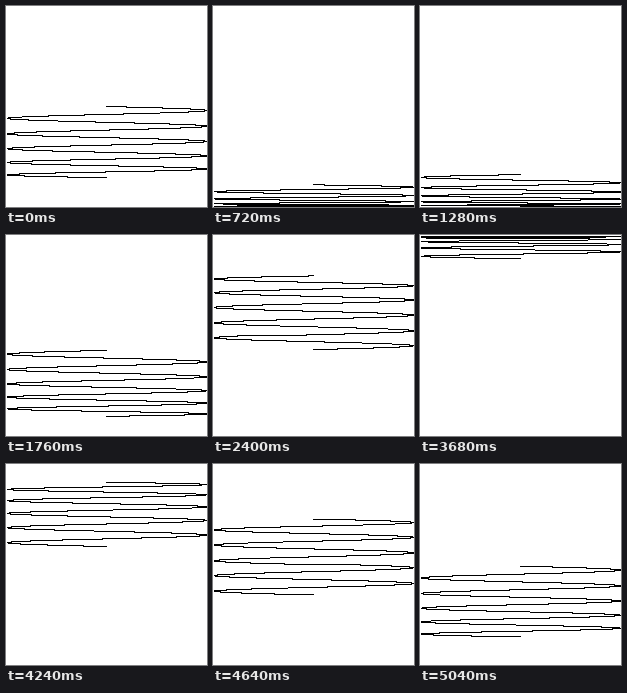
Write an HTML page with a canvas that moves like this. It is 201 px wide and 201 px high and loops after 5120 ms.

```html
<!DOCTYPE html>
<html>
<head>
<meta charset="utf-8">
<title>Lissajous</title>
<style>
  html, body { margin: 0; height: 100%; overflow: hidden; background: #fff; }
  canvas { display: block; }
</style>
</head>
<body>
<canvas id="stage" width="201" height="201"></canvas>
<script>
const SIZE = 100, WIDTH = 2 * SIZE + 1;
const CYCLES = 5, RESOLUTION = 0.001, FREQUENCY = 0.02524;
const STEPS = 64, STEP_MS = 80, PHASE_STEP = 0.1;
const WHITE = 0xffffffff, BLACK = 0xff000000;

const ctx = document.getElementById('stage').getContext('2d');
const image = ctx.createImageData(WIDTH, WIDTH);
const pixels = new Uint32Array(image.data.buffer);

// Rounds by truncating toward zero, so negative values sit one pixel inward.
const toPixel = v => SIZE + Math.trunc(v * SIZE + 0.5);

function draw(phase) {
  pixels.fill(WHITE);
  for (let t = 0; t < CYCLES * 2 * Math.PI; t += RESOLUTION) {
    const x = toPixel(Math.sin(t));
    const y = toPixel(Math.sin(t * FREQUENCY + phase));
    pixels[y * WIDTH + x] = BLACK;
  }
  ctx.putImageData(image, 0, 0);
}

let shown = -1;
const start = performance.now();

function tick() {
  const elapsed = performance.now() - start;
  const step = Math.floor(elapsed / STEP_MS) % STEPS;
  if (step !== shown) {
    shown = step;
    draw(step * PHASE_STEP);
  }
  requestAnimationFrame(tick);
}
tick();
</script>
</body>
</html>
```
